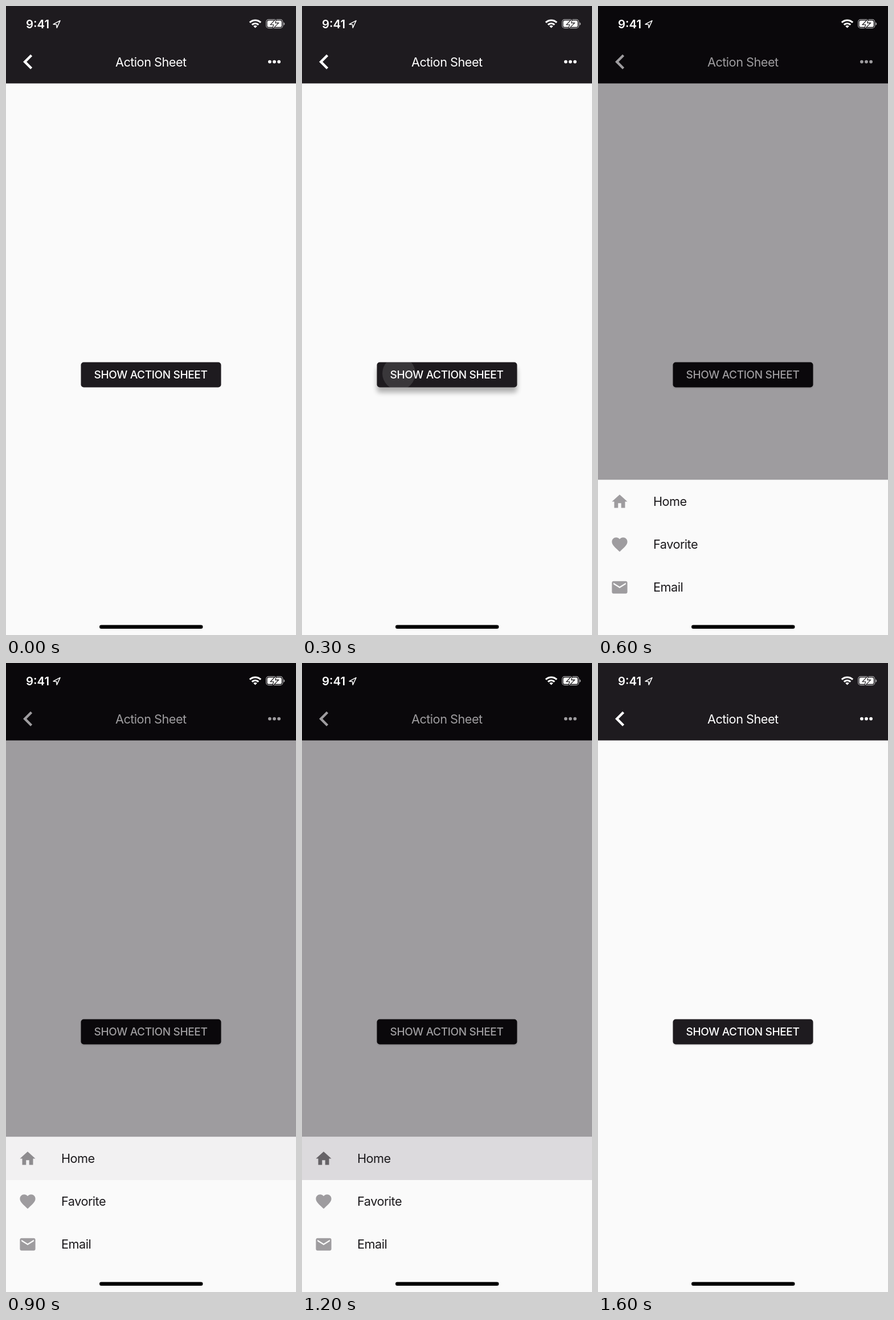
An HTML page for the animation above (2000 ms loop, 509 by 1101 pixels).

```html
<!DOCTYPE html>
<html lang="en">
<head>
<meta charset="utf-8">
<title>Action Sheet</title>
<style>
  html, body { margin: 0; width: 100%; height: 100%; overflow: hidden; background: #fafafa; }
  svg { display: block; width: 100vw; height: 100vh; }
  text { font-family: Inter, Roboto, sans-serif; font-size: 21.7px; letter-spacing: -.5px; }
  .label { fill: #1b191c; }
  .middle { text-anchor: middle; }
</style>
</head>
<body>
<svg viewBox="0 0 509 1101">
  <defs>
    <clipPath id="buttonShape"><rect x="131.5" y="623.5" width="246" height="44" rx="5"/></clipPath>
    <filter id="soft" x="-20%" y="-60%" width="140%" height="240%"><feGaussianBlur id="blur" stdDeviation="1"/></filter>
  </defs>

  <rect id="page" width="509" height="1101"/>
  <rect id="header" width="509" height="135.5"/>

  <g fill="#fff">
    <text x="35" y="38.5" style="font-size:20.4px;font-weight:600;letter-spacing:0">9:41</text>
    <path d="M95 25.6L83 31.9L88.6 32.5L89.2 38.2Z" fill="none" stroke="#fff" stroke-width="1.5" stroke-linejoin="round"/>
    <g id="wifi" fill="none" stroke="#fff"></g>
    <rect x="456.7" y="23.7" width="29" height="15" rx="4.3" fill="none" stroke="#a9a8aa" stroke-width="1.2"/>
    <rect x="458.6" y="25.6" width="25.2" height="11.2" rx="2.6"/>
    <path d="M487.2 28.4q2 .7 2 2.8t-2 2.8z" fill="#a9a8aa"/>
    <path id="bolt" d="M474 23.2L465.4 32.2H470.4L468.3 39.2L477.2 30.2H472Z" stroke-width="2.2" paint-order="stroke"/>
  </g>

  <g id="bar">
    <path transform="translate(12.7 71.7) scale(2.17)" d="M15.41 7.41L14 6l-6 6 6 6 1.41-1.41L10.83 12z"/>
    <text class="middle" x="254.3" y="105.5">Action Sheet</text>
    <circle cx="462.9" cy="97.6" r="2.9"/>
    <circle cx="471" cy="97.6" r="2.9"/>
    <circle cx="479.1" cy="97.6" r="2.9"/>
  </g>

  <rect id="shadow" x="131.5" y="623.5" width="246" height="44" rx="5" filter="url(#soft)"/>
  <rect id="button" x="131.5" y="623.5" width="246" height="44" rx="5"/>
  <g clip-path="url(#buttonShape)"><circle id="ripple" cx="170" cy="643" fill="#fff"/></g>
  <text id="caption" class="middle" x="254" y="652.4" style="font-size:19px;font-weight:500;letter-spacing:-.35px">SHOW ACTION SHEET</text>

  <g id="sheet">
    <rect y="829.5" width="509" height="272" fill="#fafafa"/>
    <rect id="row" y="829.5" width="509" height="75.5"/>
    <g fill="#9e9c9f">
      <path id="home" transform="translate(21.7 851.3) scale(1.357)" d="M10 20v-6h4v6h5v-8h3L12 3 2 12h3v8z"/>
      <path transform="translate(21.7 926.3) scale(1.357)" d="M12 21.35l-1.45-1.32C5.4 15.36 2 12.28 2 8.5 2 5.42 4.42 3 7.5 3c1.74 0 3.41.81 4.5 2.09C13.09 3.81 14.76 3 16.5 3 19.58 3 22 5.42 22 8.5c0 3.78-3.4 6.86-8.55 11.54z"/>
      <path transform="translate(21.7 1001.3) scale(1.357)" d="M20 4H4c-1.1 0-2 .9-2 2v12c0 1.1.9 2 2 2h16c1.1 0 2-.9 2-2V6c0-1.1-.9-2-2-2zm0 4l-8 5-8-5V6l8 5 8-5z"/>
    </g>
    <g class="label">
      <text x="97" y="875.3">Home</text>
      <text x="97" y="950.3">Favorite</text>
      <text x="97" y="1025.3">Email</text>
    </g>
  </g>

  <rect x="164" y="1083.4" width="181.5" height="6.6" rx="3.3"/>
</svg>
<script>
const LOOP = 2000;
const $ = id => document.getElementById(id);
const set = (id, attrs) => {
  for (const key in attrs) $(id).setAttribute(key, attrs[key]);
};
const mix = (a, b, p) => `rgb(${a.map((v, i) => Math.round(v + (b[i] - v) * p))})`;

const INK = '#1e1b1f', DIM_INK = '#0a080b';
const PAPER = '#fafafa', DIM_PAPER = '#9e9c9f';

// Shadow: vertical offset, blur, opacity
const FLAT = [0, 1, 0], LOW = [1.6, 1.3, .14], RISING = [4, 2.5, .2], HIGH = [9, 4.2, .3];

// Each step holds until the next one starts
const steps = [
  { at: 0, shadow: FLAT },
  { at: 200, shadow: RISING, radius: 14, glow: .08 },
  { at: 300, shadow: HIGH, radius: 29, glow: .12 },
  { at: 400, sheet: true, shadow: FLAT, fill: '#3c3a3d', drop: .5 },
  { at: 500, sheet: true, shadow: LOW, fill: '#211f22', drop: .2 },
  { at: 600, sheet: true, shadow: LOW },
  { at: 900, sheet: true, shadow: LOW, press: .28 },
  { at: 1000, sheet: true, shadow: LOW, press: .52 },
  { at: 1100, sheet: true, shadow: LOW, press: .76 },
  { at: 1200, sheet: true, shadow: LOW, press: 1 },
  { at: 1300, shadow: FLAT },
  { at: 1400, shadow: LOW }
];

function drawWifi() {
  const k = Math.SQRT1_2;
  for (const [r, width] of [[2.3, 4.6], [8.1, 3.2], [13.6, 3.2]]) {
    const arc = document.createElementNS('http://www.w3.org/2000/svg', 'path');
    arc.setAttribute('d', `M${437.5 - r * k} ${38.6 - r * k}A${r} ${r} 0 0 1 ${437.5 + r * k} ${38.6 - r * k}`);
    arc.setAttribute('stroke-width', width);
    $('wifi').append(arc);
  }
}

function show(step) {
  const { sheet = false, press = 0, drop = 0, radius = 0, glow = 0 } = step;
  const ink = sheet ? DIM_INK : INK;
  const [dy, blur, opacity] = step.shadow;
  set('page', { fill: sheet ? DIM_PAPER : PAPER });
  set('header', { fill: ink });
  set('bolt', { stroke: ink });
  set('bar', { fill: sheet ? DIM_PAPER : '#fff' });
  set('caption', { fill: sheet ? DIM_PAPER : '#fff' });
  set('button', { fill: step.fill || ink });
  set('shadow', { transform: `translate(0 ${dy})`, opacity });
  set('blur', { stdDeviation: blur });
  set('ripple', { r: radius, opacity: glow });
  set('sheet', { visibility: sheet ? 'visible' : 'hidden', transform: `translate(0 ${drop})` });
  set('row', { fill: mix([250, 250, 250], [220, 218, 221], press) });
  set('home', { fill: mix([158, 156, 159], [102, 99, 103], press) });
}

let current;
function tick() {
  const t = performance.now() % LOOP;
  const step = steps.findLast(s => s.at <= t);
  if (step !== current) show(current = step);
  requestAnimationFrame(tick);
}

drawWifi();
tick();
</script>
</body>
</html>
```
